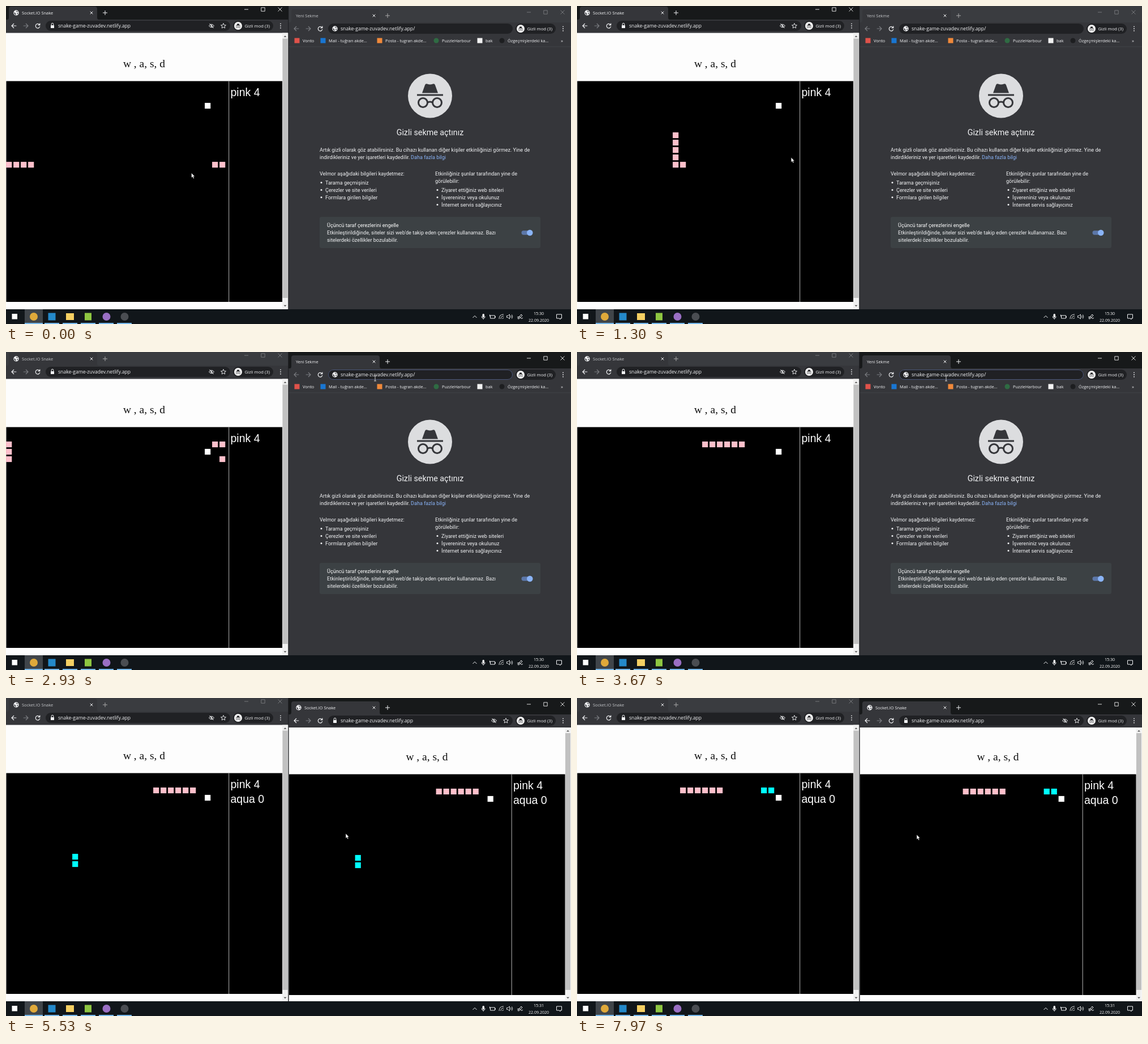
These frames come from a looping animation (998x561 px, 8000 ms). An HTML page with a canvas:

```html
<!DOCTYPE html>
<html lang="tr">
<head>
<meta charset="utf-8">
<title>Snake</title>
<style>
  html, body { margin: 0; width: 100%; height: 100%; overflow: hidden; background: #000; }
  canvas { display: block; }
</style>
</head>
<body>
<canvas id="stage" width="998" height="561"></canvas>
<script>
const ctx = document.getElementById('stage').getContext('2d');
const LOOP = 8000, CELL = 13, COLS = 30;
const FOCUS_AT = 2350, LOAD_AT = 4200, CLOCK_AT = 4750;
const UI = '"Open Sans", sans-serif', PAGE = 'Roboto, sans-serif';
const GAME = '"Liberation Sans", sans-serif', SERIF = '"Liberation Serif", serif';
const TOOLBAR = '#35363a', FIELD = '#202124', DIM = '#7b7d81', LIGHT = '#f1f2f4';
const ADDRESS = 'snake-game-zuvadev.netlify.app';

// Drawing helpers
function box(x, y, w, h, color, radius = 0) {
  ctx.fillStyle = color;
  ctx.beginPath();
  ctx.roundRect(x, y, w, h, radius);
  ctx.fill();
}
function disc(x, y, r, color) {
  ctx.fillStyle = color;
  ctx.beginPath();
  ctx.arc(x, y, r, 0, Math.PI * 2);
  ctx.fill();
}
function shape(d, x, y, { stroke, fill, width = 1, scale = 1 }) {
  const path = new Path2D(d);
  ctx.save();
  ctx.translate(x, y);
  ctx.scale(scale, scale);
  ctx.lineWidth = width;
  if (fill) { ctx.fillStyle = fill; ctx.fill(path); }
  if (stroke) { ctx.strokeStyle = stroke; ctx.stroke(path); }
  ctx.restore();
}
function line(d, x, y, stroke = LIGHT, width = 1) { shape(d, x, y, { stroke, width }); }
function text(str, x, y, size, color = LIGHT, family = UI, align = 'left') {
  ctx.font = `${size}px ${family}`;
  ctx.textAlign = align;
  ctx.fillStyle = color;
  ctx.fillText(str, x, y);
}

// Icons
function globe(x, y) {
  disc(x, y, 4.7, LIGHT);
  shape('M-3.6-1Q-1 0-1 1.5T0 4Q-3.4 3.6-3.6-1ZM-.5-3.6Q1-1 3.5-1.5Q2.5-3.6-.5-3.6ZM1 .5H3.6L2 3Z', x, y, { fill: TOOLBAR });
}
function incognito(x, y, r, bg, fg) {
  disc(x, y, r, bg);
  const scale = r / 39;
  shape('M-14-5L-9-19Q-8-22-5-21Q0-19 5-21Q8-22 9-19L14-5ZM-23-3H23V0H-23Z', x, y, { fill: fg, scale });
  shape('M-4.5 12A8 8 0 1 1-20.5 12A8 8 0 1 1-4.5 12Q0 9 4.5 12A8 8 0 1 1 20.5 12A8 8 0 1 1 4.5 12', x, y, { stroke: fg, width: 3, scale });
}
function star(x, y) {
  line('M0-4.5L1.3-1.4 4.5-1.2 2 .9 2.8 4 0 2.3-2.8 4-2 .9-4.5-1.2-1.3-1.4Z', x, y, LIGHT, .9);
}
function hiddenEye(x, y) {
  line('M-4.5 0Q0-5.5 4.5 0Q0 5.5-4.5 0ZM-3.5-4L3.5 4', x, y, LIGHT, 1);
  disc(x, y, 1.5, LIGHT);
}

// Browser frame: dy shifts the header, blank means an empty new tab
function browser(ox, dy, active, blank, typing) {
  ctx.save();
  ctx.translate(ox, 0);
  box(0, 0, 499, 561, active ? '#17191a' : '#3a3c40');
  shape('M2 24Q5 24 5 20V5Q5 1 9 1H157Q161 1 161 5V20Q161 24 164 24Z', 0, dy, { fill: TOOLBAR });
  ctx.translate(0, dy);
  const label = active ? LIGHT : '#c4c6c9', control = active ? '#f1f1f1' : DIM;
  if (blank) text('Yeni Sekme', 13, 15, 7.45, label);
  else { globe(18, 12); text('Socket.IO Snake', 28, 15, 7.45, label); }
  line('M-2.3-2.3L2.3 2.3M2.3-2.3L-2.3 2.3', 151, 12);
  line('M-4 0H4M0-4V4', 175, 12, active ? LIGHT : '#aaa');
  line('M-3.5 0H3.5', 424.5, 6, control, .9);
  line('M-3.2-3.2H3.2V3.2H-3.2Z', 454, 6, control, .9);
  line('M-3.5-3.5L3.5 3.5M3.5-3.5L-3.5 3.5', 484, 6, control, .9);

  box(0, 24, 499, 24, TOOLBAR);
  line('M4.3 0H-4M0-4L-4 0 0 4', 14, 35, blank ? DIM : LIGHT, 1.2);
  line('M-4.3 0H4M0-4L4 0 0 4', 35, 35, DIM, 1.2);
  line('M3-2.2A3.8 3.8 0 1 0 3.8 1M3.8-4.5V-1.3H.6', 56, 35, LIGHT, 1.2);
  box(70, 26, 326, 18, FIELD, 9);
  if (typing) {
    ctx.strokeStyle = '#4b5678';
    ctx.lineWidth = 1;
    ctx.beginPath();
    ctx.roundRect(70.5, 26.5, 325, 17, 8.5);
    ctx.stroke();
  }
  if (blank) globe(82, 35);
  else {
    box(79, 34, 6, 5, LIGHT, .5);
    line('M-1.8 0V-2A1.8 1.8 0 0 1 1.8-2V0', 82, 34, LIGHT, 1);
    hiddenEye(363, 35);
    star(384, 35);
  }
  text(ADDRESS + (blank ? '/' : ''), 92, 38.3, 8.65);
  box(401, 26, 71, 18, FIELD, 9);
  incognito(410, 35, 7, '#f4f4f4', FIELD);
  text('Gizli mod (3)', 421.5, 37.8, 7.7);
  for (const y of [31.3, 35, 38.7]) disc(485, y, .9, LIGHT);
  ctx.restore();
}

// Snakes: a route is a string of moves such as "L20 U7"
function walk(col, row, route) {
  const cells = [[col, row]];
  const moves = { L: [-1, 0], R: [1, 0], U: [0, -1], D: [0, 1] };
  for (const leg of route.split(' ')) {
    const [dx, dy] = moves[leg[0]];
    for (let i = 0; i < +leg.slice(1); i++) cells.push([col += dx, row += dy]);
  }
  return cells;
}
const wrap = col => (col % COLS + COLS) % COLS;
const snakes = [
  { name: 'pink 4', color: 'pink', length: 6, lead: 5, cells: walk(33, 11, 'L20 U7 R17 U2 L85') },
  { name: 'aqua 0', color: 'aqua', length: 2, lead: -67, cells: walk(9, 25, 'U14 U3 R4 D3 R5 U11 R5 D2 R8') },
];
// [time, steps taken]: the server ticks at a slightly uneven pace
const ticks = [[0, 0], [730, 10], [1970, 29], [3670, 54], [5530, 81], [6630, 98], [8000, 117.4]];
function along(points, t, ease = k => k) {
  const i = Math.max(1, points.findIndex(p => p[0] >= t));
  const a = points[i - 1], b = points[i], k = ease((t - a[0]) / (b[0] - a[0]));
  return a.slice(1).map((v, j) => v + (b[j + 1] - v) * k);
}

function drawCell(col, row, color) {
  box(wrap(col) * CELL + .1, row * CELL - .6, 10.2, 10.2, color);
}
function game(ox, oy, step, top) {
  ctx.save();
  ctx.translate(ox, 0);
  box(0, top, 499, 535 - top, '#fdfdfd');
  text('w , a, s, d', 244, 108 + oy, 19.5, '#111', SERIF, 'center');
  box(488, top, 10, 535 - top, '#f1f1f1');
  box(488.5, top + 10, 9, 515 - top - 10, '#c1c1c1');
  shape('M-2.5 1.3L0-1.3 2.5 1.3Z', 493, top + 6, { fill: '#505050' });
  shape('M-2.5-1.3L0 1.3 2.5-1.3Z', 493, 529, { fill: '#505050' });
  ctx.translate(0, 132.5 + oy);
  box(.5, 0, 487.5, 389.5, '#000');
  box(393.2, 0, 1, 389.5, '#b8b8b8');
  drawCell(27, 3, '#fff');
  snakes.forEach((snake, i) => {
    const head = step + snake.lead;
    if (head < snake.length - 1) return;
    text(snake.name, 396.5, 26 + i * 26, 19.5, '#fff', GAME);
    for (const [col, row] of snake.cells.slice(head - snake.length + 1, head + 1))
      drawCell(col, row, snake.color);
  });
  ctx.restore();
}

function newTab() {
  box(499, 51, 499, 484, TOOLBAR);
  const bookmarks = [
    [514, '#e0524a', 'Vonto'], [560, '#1976d2', 'Mail - tuğran akde...'],
    [660, '#f0893a', 'Posta - tugran akde...'], [760, '#2f6b43', 'PuzzleHarbour', true],
    [837, '#f2f2f2', 'bak'], [876, '#1d1e20', 'Özgeçmişlerdeki ka...', true],
  ];
  for (const [x, color, label, round] of bookmarks) {
    if (round) disc(x, 61, 4.5, color); else box(x - 4.5, 56.5, 9, 9, color);
    text(label, x + 10, 63.5, 7.4);
  }
  text('»', 980, 63.5, 8);
  box(499, 71.5, 499, .7, '#44464a');

  incognito(749, 158.5, 39, '#dcdddf', TOOLBAR);
  text('Gizli sekme açtınız', 749, 227.5, 14.3, LIGHT, PAGE, 'center');
  const lines = [
    [554, 257, 'Artık gizli olarak göz atabilirsiniz. Bu cihazı kullanan diğer kişiler etkinliğinizi görmez. Yine de'],
    [554, 270, 'indirdikleriniz ve yer işaretleri kaydedilir.'],
    [554, 299, 'Velmor aşağıdaki bilgileri kaydetmez:'],
    [564, 314.5, 'Tarama geçmişiniz', true], [564, 327.5, 'Çerezler ve site verileri', true],
    [564, 340.5, 'Formlara girilen bilgiler', true],
    [758, 299, 'Etkinliğiniz şunlar tarafından yine de'], [758, 312, 'görülebilir:'],
    [769, 327.5, 'Ziyaret ettiğiniz web siteleri', true], [769, 340.5, 'İşvereniniz veya okulunuz', true],
    [769, 353.5, 'İnternet servis sağlayıcınız', true],
  ];
  for (const [x, y, str, bullet] of lines) {
    text(str, x, y, 9.1, LIGHT, PAGE);
    if (bullet) disc(x - 7, y - 3, 1.5, LIGHT);
  }
  text('Daha fazla bilgi', 715, 270, 9.1, '#8ab4f8', PAGE);

  box(554, 372, 390, 55, '#3c4144', 3);
  text('Üçüncü taraf çerezlerini engelle', 567, 390, 9.1, '#fff', PAGE);
  text("Etkinleştirildiğinde, siteler sizi web'de takip eden çerezler kullanamaz. Bazı", 567, 403, 9.1, LIGHT, PAGE);
  text('sitelerdeki özellikler bozulabilir.', 567, 416, 9.1, LIGHT, PAGE);
  box(910.5, 396.3, 18, 7.4, '#5c77a8', 3.7);
  disc(925.3, 400, 5.3, '#8ab4f8');
}

function taskbar(t) {
  box(0, 535, 998, 26, '#11161a');
  box(33, 535, 32, 26, '#40454a');
  box(10.5, 543, 9.5, 9.5, '#fff');
  disc(49, 548, 7, '#e0a93a');
  box(74.5, 541.5, 13, 13, '#2489ca');
  box(106, 542, 14, 12, '#f5cf62');
  box(139, 541.5, 12, 13, '#8ec641');
  disc(177.5, 548, 7, '#9a6fc4');
  disc(209.5, 548, 7, '#4a4d52');
  for (let i = 0; i < 6; i++) box(i ? 36 + i * 32 : 33, 559, i ? 26 : 32, 2, '#76b9ed');

  line('M-3.5 2L0-1.5 3.5 2', 828, 548);
  box(841.5, 543, 3.5, 6.5, '#fff', 1.7);
  line('M-3 0Q-3 3.5 0 3.5T3 0M0 3.5V5.5', 843.2, 547.5);
  line('M-4-2.5H4V2.5H-4ZM5-1V1M-5-4V-1', 859.5, 548.5);
  line('M-4 4Q-4-4 4-4M-1 4Q-1-1 4-1M2 4Q2 2 4 2', 875, 548, '#ddd');
  line('M-5-1.5H-3L0-4V4L-3 1.5H-5ZM2-2Q3.5 0 2 2M4-3.5Q6.5 0 4 3.5', 889.5, 548, LIGHT, .9);
  line('M-4 3.5L2-4 4-2-2 4ZM-5 1Q-1-1 1 2T5 2', 908, 548);
  text(t < CLOCK_AT ? '15:30' : '15:31', 941, 544.7, 7.1, '#fff', UI, 'center');
  text('22.09.2020', 941, 556.5, 7.1, '#fff', UI, 'center');
  line('M-4.5-4H4.5V3H2V5L0 3H-4.5Z', 977, 548);
}

const mouse = [[0, 327.5, 294.5], [1150, 327.5, 294.5], [1800, 698, 94], [2100, 698, 94], [2700, 652, 46.5],
  [4250, 652, 46.5], [4900, 600, 239], [5900, 600, 239], [6100, 600, 241], [8000, 600, 241]];
function pointer(t) {
  const [x, y] = along(mouse, t, k => k * k * (3 - 2 * k));
  const overAddress = x > 570 && y < 50;
  if (overAddress) line('M-2-4.5H2M0-4.5V4.5M-2 4.5H2', x, y, '#ddd', .9);
  else shape('M0 0V8.6L2 6.8 3.3 10 4.9 9.3 3.5 6.2H6Z', x, y, { fill: '#fff', stroke: '#111', width: .6 });
}

function draw() {
  const t = performance.now() % LOOP;
  const step = Math.floor(along(ticks, t)[0] + .3);
  const rightActive = t >= FOCUS_AT, loaded = t >= LOAD_AT;
  browser(0, 0, !rightActive, false, false);
  game(0, 0, step, 47.5);
  browser(499, 5, rightActive, !loaded, rightActive && !loaded);
  if (loaded) game(499.5, 2, step, 52);
  else newTab();
  box(498.3, 0, 1, 535, '#1b1c1e');
  taskbar(t);
  pointer(t);
  requestAnimationFrame(draw);
}
draw();
</script>
</body>
</html>
```
